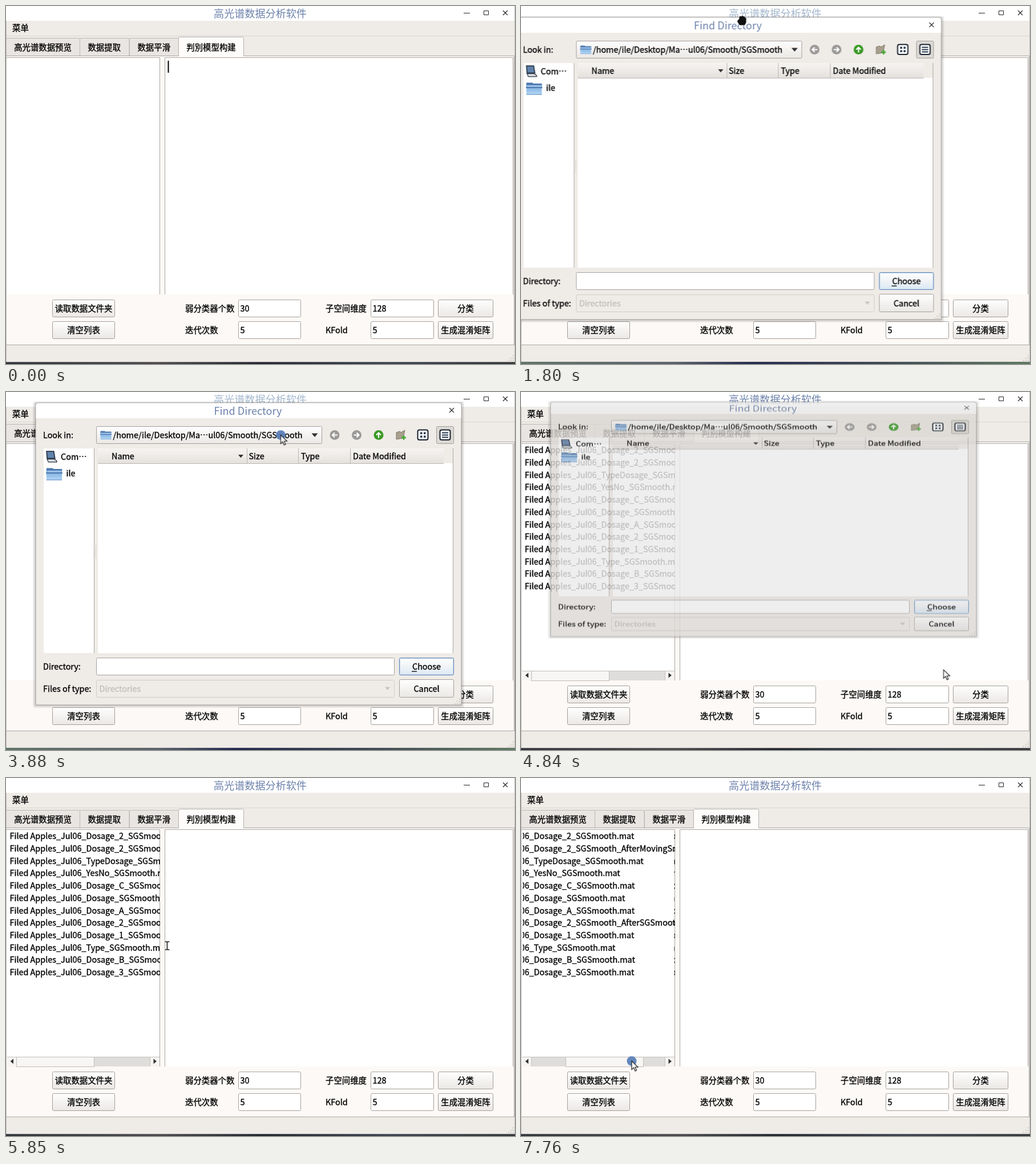
Animation of 892 by 628 pixels, one loop 8 s. Source, as an HTML page:

```html
<!DOCTYPE html>
<html lang="zh-CN">
<head>
<meta charset="utf-8">
<title>高光谱数据分析软件</title>
<style>
html, body { margin: 0; width: 100%; height: 100%; overflow: hidden; background: #efebe7; }
svg { display: block; width: 892px; height: 628px; }
text {
  font: 500 14.4px "Noto Sans CJK SC", "Noto Sans", sans-serif; white-space: pre;
  color: #000; fill: currentColor; stroke: currentColor; stroke-width: .35px;
}
.mid { text-anchor: middle; }
.big { font-size: 18.1px; font-weight: 400; color: #6c81ab; stroke: none; text-anchor: middle; }
.dim { color: #c3bfbb; }
.field { fill: #fff; stroke: #a5a19d; }
.btn { fill: url(#face); stroke: #a29e9a; }
.line { fill: none; stroke: #aaa6a2; }

/* on/off states switch hard, paths run linearly */
.sw { animation: 8s step-end infinite; }
.mv { animation: 8s linear infinite; }
#title { animation-name: title; }
#strip { animation-name: modal; }
#caret { animation-name: caret; }
#press { animation-name: press; }
#dlg { animation-name: drag; }
#fold { animation-name: fold; transform-origin: 0 19px; }
#pop { animation-name: pop; }
#hl { animation-name: hl; }
#row0 { animation-name: row0; }
#row1 { animation-name: row1; }
#files { animation-name: files; }
#rows { animation-name: scroll; }
#thumb { animation-name: thumb; }
#ptr { animation-name: path; }
#arrow { animation-name: arrow; }
#hand { animation-name: hand; }
#beam { animation-name: beam; }
#ring { animation-name: ring; }
#dot { animation-name: dot; }
#hover { animation-name: hover; }

@keyframes title { 0% { color: #6c81ab } 9.75% { color: #a3b7cd } 59.5% { color: #6c81ab } }
@keyframes modal { 0% { visibility: hidden } 9.75% { visibility: visible } 59.5% { visibility: hidden } }
@keyframes caret { 0% { visibility: visible } 5.125% { visibility: hidden } }
@keyframes press { 0% { visibility: hidden } .625% { visibility: visible } 9.75% { visibility: hidden } }
@keyframes hover { 0% { visibility: hidden } 81.7% { visibility: visible } 84.5% { visibility: hidden } }
@keyframes drag {
  0%, 20.5% { transform: translate(-118px, 1px) }
  22.5%, 22.9% { transform: translate(-61.5px, 1px) }
  25.25%, to { transform: none }
}
@keyframes fold {
  0%, 9.75% { transform: translateY(-6px) scaleY(.05); opacity: 0; filter: brightness(.7) }
  14%, 59.5% { transform: none; opacity: 1; filter: brightness(1) }
  63%, 63.4% { transform: translateY(-5px) scaleY(.228); opacity: .4; filter: brightness(.73) }
  64.5%, to { transform: translateY(-6px) scaleY(.05); opacity: 0; filter: brightness(.7) }
}
@keyframes pop { 0% { visibility: hidden } 29.375% { visibility: visible } 48.5% { visibility: hidden } }
@keyframes hl { 0% { transform: none } 37% { transform: translateY(31px) } 41.4% { transform: none } }
@keyframes row0 { 0% { color: #fff } 37% { color: #000 } 41.4% { color: #fff } }
@keyframes row1 { 0% { color: #000 } 37% { color: #fff } 41.4% { color: #000 } }
@keyframes files { 0% { visibility: hidden } 59.5% { visibility: visible } }
@keyframes thumb {
  0%, 86.875% { transform: none }
  88.125%, 93% { transform: translateX(16px) }
  97%, to { transform: translateX(60px) }
}
@keyframes scroll {
  0%, 86.875% { transform: none }
  88.125%, 93% { transform: translateX(-31.5px) }
  97%, to { transform: translateX(-118px) }
}
@keyframes path {
  0%, 12.5% { transform: translate(140px, 520px) }
  18.75%, 20.5% { transform: translate(330px, 25px) }
  22.5%, 22.9% { transform: translate(387px, 25px) }
  25.25% { transform: translate(448px, 24px) }
  27.875%, 32.875% { transform: translate(482px, 76px) }
  36.375% { transform: translate(477.5px, 87px) }
  38.375%, 40.375% { transform: translate(476px, 101px) }
  42.875% { transform: translate(478px, 77px) }
  43.875%, 49.25% { transform: translate(481.5px, 75.5px) }
  58%, 60% { transform: translate(742px, 491px) }
  63%, 63.5% { transform: translate(733px, 469px) }
  69%, 69.5% { transform: translate(308px, 288px) }
  73.625%, 75.875% { transform: translate(279px, 295px) }
  78.75% { transform: translate(180px, 104px) }
  83% { transform: translate(125px, 522px) }
  85.875%, 86.875% { transform: translate(133.5px, 499px) }
  88.125%, 93% { transform: translate(149.5px, 498px) }
  97%, to { transform: translate(194px, 496.5px) }
}
@keyframes arrow {
  0% { visibility: hidden } 12.5% { visibility: visible } 20.25% { visibility: hidden }
  25.25% { visibility: visible } 61% { visibility: hidden } 76% { visibility: visible }
}
@keyframes hand { 0% { visibility: hidden } 20.25% { visibility: visible } 25.25% { visibility: hidden } }
@keyframes beam { 0% { visibility: hidden } 61% { visibility: visible } 76% { visibility: hidden } }
@keyframes ring { 0% { visibility: hidden } 61% { visibility: visible } 68% { visibility: hidden } }
@keyframes dot {
  0% { visibility: hidden } 28.6% { visibility: visible } 29.375% { visibility: hidden }
  48.5% { visibility: visible } 49.5% { visibility: hidden }
  59% { visibility: visible } 60% { visibility: hidden } 86.375% { visibility: visible }
}
</style>
</head>
<body>
<svg id="stage" viewBox="0 0 892 628" xmlns="http://www.w3.org/2000/svg">
  <defs>
    <linearGradient id="face" x2="0" y2="1"><stop stop-color="#fefefe"/><stop offset="1" stop-color="#ebe8e5"/></linearGradient>
    <linearGradient id="glow" x2="0" y2="1"><stop stop-color="#fdfeff"/><stop offset=".5" stop-color="#f1f4f7"/><stop offset="1" stop-color="#dbe8f4"/></linearGradient>
    <linearGradient id="head" x2="0" y2="1"><stop stop-color="#f6f4f2"/><stop offset="1" stop-color="#e5e1dd"/></linearGradient>
    <linearGradient id="sel" x2="0" y2="1"><stop stop-color="#7a96c1"/><stop offset="1" stop-color="#6684b4"/></linearGradient>
    <linearGradient id="blue" x2="0" y2="1"><stop stop-color="#86b4e2"/><stop offset="1" stop-color="#b4d6f4"/></linearGradient>
    <linearGradient id="desk"><stop stop-color="#30343a"/><stop offset=".3" stop-color="#4a4a4c"/><stop offset=".5" stop-color="#22262e"/><stop offset=".75" stop-color="#3c4450"/><stop offset="1" stop-color="#35383a"/></linearGradient>
    <linearGradient id="desk2"><stop stop-color="#5d7468"/><stop offset=".3" stop-color="#59616a"/><stop offset=".45" stop-color="#20284e"/><stop offset=".7" stop-color="#3a4450"/><stop offset="1" stop-color="#5c7a60"/></linearGradient>
    <clipPath id="view"><path d="M3 91H268.5V488H3Z"/></clipPath>
    <clipPath id="edge"><path d="M268.5 91H270V488H268.5Z"/></clipPath>
    <symbol id="dir" viewBox="0 0 20 16">
      <path d="M.5 1H8L9 2H19.5V8H.5Z" fill="#4a78b0"/><path d="M1 4H19V7H1Z" fill="#9cc0e6"/>
      <path d="M.5 7H19.5V15.5H.5Z" fill="url(#blue)"/><path d="M0 7H20" stroke="#3f6ea8" stroke-width="1.2"/>
      <path d="M.5 15.5H19.5" stroke="#7ba6d4"/>
    </symbol>
    <symbol id="pc" viewBox="0 0 20 20">
      <path d="M2 1H14L16 13H3Z" fill="#5f82ac" stroke="#26313f" stroke-width="1.6"/>
      <path d="M3 14H15L19 17V19H5Z" fill="#d9dde2" stroke="#26313f" stroke-width="1.2"/>
    </symbol>
    <symbol id="disk" viewBox="0 0 20 20">
      <path d="M3 1H17L19 14V19H1V14Z" fill="#a9b9cd" stroke="#6f8299"/><circle cx="10" cy="8" r="5" fill="#dfe7f0" stroke="#7f93ab"/>
      <path d="M3 16H17" stroke="#5f738b" stroke-width="2"/>
    </symbol>
  </defs>
  <g id="main"></g>
  <g id="dlg" class="mv"><g id="fold" class="mv"></g></g>
  <g id="pop" class="sw"></g>
  <g id="ptr" class="mv">
    <circle id="dot" class="sw" r="8.5" fill="#5b80b8" opacity=".95"/>
    <g id="ring" class="sw"><circle cx="10" cy="14.5" r="10.5" fill="#fff" stroke="#a5d2f5" stroke-width="5"/></g>
    <path id="arrow" class="sw" d="M0 0V15L3.5 11.7L6 17.5L8.5 16.5L6 10.8H11Z" fill="#fff" stroke="#111" stroke-width="1.1"/>
    <path id="hand" class="sw" d="M-8 0L-5-2V-6Q-3-9-1-7Q1-10 3-7Q6-8 6-5Q9-5 8-1V4L5 9H-4L-8 3Z" fill="#111" stroke="#fff" stroke-width=".8"/>
    <g id="beam" class="sw" fill="none"><path d="M-4-7H-1L0-6L1-7H4M0-6V6M-4 7H-1L0 6L1 7H4" stroke="#fff" stroke-width="3.4"/><path d="M-4-7H-1L0-6L1-7H4M0-6V6M-4 7H-1L0 6L1 7H4" stroke="#111" stroke-width="1.6"/></g>
  </g>
</svg>
<script>
const $ = id => document.getElementById(id);
// y is the middle of the line of text; baselines sit on whole pixels
const txt = (x, y, s, attr = '') => `<text x="${x}" y="${Math.round(y + 5.3)}" ${attr}>${s}</text>`;
const box = (x, y, w, h, attr = '') => `<rect x="${x}" y="${y}" width="${w}" height="${h}" ${attr}/>`;
const path = (d, attr = 'class="line"') => `<path d="${d}" ${attr}/>`;
const use = (id, x, y, w, h) => `<use href="#${id}" x="${x}" y="${y}" width="${w}" height="${h}"/>`;
const button = (x, y, w, s) => box(x + .5, y + .5, w - 1, 30, 'rx="2" class="btn"') + txt(x + w / 2, y + 15.5, s, 'class="mid"');
const field = (x, y, w, s = '') => box(x + .5, y + .5, w - 1, 30, 'rx="2" class="field"') + txt(x + 3.5, y + 15.5, s);
const tab = (x, w, s) => box(x + .5, 56.5, w, 31, 'rx="1.5" fill="#e9e5e2" stroke="#bbb7b3"') + txt(x + w / 2, 73, s, 'class="mid"');
const grip = (x, y) => [[8, 0], [4, 4], [8, 4], [0, 8], [4, 8], [8, 8]].map(p => box(x + p[0], y + p[1], 1.5, 1.5, 'fill="#b5b1ad"')).join('');
const cross = (x, y) => path(`M${x - 4} ${y - 4}l8 8m0-8l-8 8`, 'stroke="#222" stroke-width="1.1"');

const tail = '_SGSmooth';
const names = ['Dosage_2' + tail, `Dosage_2${tail}_AfterMovingSmooth`, 'TypeDosage' + tail, 'YesNo' + tail,
  'Dosage_C' + tail, 'Dosage' + tail, 'Dosage_A' + tail, `Dosage_2${tail}_After${tail.slice(1)}`,
  'Dosage_1' + tail, 'Type' + tail, 'Dosage_B' + tail, 'Dosage_3' + tail];
const rows = names.map((n, i) => txt(6.5, 102 + i * 21.7, `Filed Apples_Jul06_${n}.mat`)).join('');

$('main').innerHTML =
  box(0, 0, 892, 26, 'fill="#fff"') + box(0, 26, 892, 599, 'fill="#efebe7"') +
  `<text id="title" class="big sw" x="445.5" y="20">高光谱数据分析软件</text>` +
  path('M802 12.5H813M837.5 8.5H845.5V15.5H837.5Z', 'fill="none" stroke="#222"') + cross(875, 12) +
  txt(11, 39, '菜单') + path('M0 52.5H892', 'stroke="#d9d5d1"') +
  box(0, 87, 891, 508, 'fill="#fcf9f6"') +
  tab(0, 129, '高光谱数据预览') + tab(129, 86.5, '数据提取') + tab(216, 86.5, '数据平滑') +
  path('M0 87.5H890.5V594.5') +
  path('M302.5 91V56.5Q302.5 54.5 304.5 54.5H414.5Q416.5 54.5 416.5 56.5V91', 'fill="#fdfcfa" stroke="#b5b1ad"') +
  box(301, 88, 117, 4, 'fill="#fcf9f6"') + txt(359.5, 72.5, '判別模型构建', 'class="mid"') +
  box(1, 90, 269, 416, 'fill="#fff"') + path('M1 90.5H269.5V506') +
  box(278, 90, 611, 416, 'fill="#fff"') + path('M278.5 506V90.5H888.5V506') +
  box(283.5, 96, 2, 21, 'id="caret" class="sw"') +
  button(81, 515, 110, '读取数据文件夹') + button(81, 553, 110, '清空列表') +
  box(82, 523, 108, 21, 'id="press" class="sw" fill="#000" opacity=".04"') +
  box(82, 516, 108, 29, 'id="hover" class="sw" fill="#fff" opacity=".35"') +
  txt(314, 530.5, '弱分类器个数') + field(407, 515, 110, '30') +
  txt(314, 569, '迭代次数') + field(407, 553, 110, '5') +
  txt(560, 530.5, '子空间维度') + field(639, 515, 111, '128') +
  txt(560, 569, 'KFold') + field(639, 553, 111, '5') +
  button(757, 515, 97, '分类') + button(757, 553, 97, '生成混淆矩阵') +
  path('M0 594.5H892') + grip(880, 613) +
  path('M.5 26V625M891.5 0V625', 'stroke="#c4c0bc"') +
  box(0, 624.5, 892, 4, 'fill="url(#desk)"') + box(0, 624.5, 892, 4, 'id="strip" class="sw" fill="url(#desk2)"') +
  `<g id="files" class="sw"><g clip-path="url(#view)"><g id="rows" class="mv">${rows}</g></g>` +
  `<g clip-path="url(#edge)">${rows}</g>` +
  box(2, 489, 267, 17, 'fill="#f6f4f2"') + box(18, 489, 235, 17, 'fill="#dfdddb"') +
  path('M2 489.5H269M18.5 489V506M252.5 489V506', 'stroke="#c5c1bd"') +
  box(18.5, 489.5, 136, 17, 'id="thumb" class="mv" fill="#f7f6f4" stroke="#c0bcb8"') +
  path('M13 492.5V501.5L7.5 497ZM258.5 492.5V501.5L264 497Z', 'fill="#333"') + '</g>';

const round = (x, fill, d) => `<circle cx="${x}" cy="75.5" r="8.5" fill="${fill}"/>` +
  path(d, 'fill="none" stroke="#fff" stroke-width="2.2"');

$('fold').innerHTML =
  [5, 3, 1].map(g => box(52 - g, 19 - g / 2, 746 + 2 * g, 530 + g * 1.5, 'rx="4" fill="#000" opacity=".07"')).join('') +
  path('M52 549V23Q52 19 56 19H794Q798 19 798 23V549Z', 'fill="#efebe7" stroke="#8f8b88" stroke-width=".8"') +
  path('M52.5 46V23Q52.5 19.5 56 19.5H794Q797.5 19.5 797.5 23V46Z', 'fill="#fff"') +
  '<text class="big" x="424" y="40">Find Directory</text>' + cross(781, 32) +
  txt(65, 75.5, 'Look in:') + box(158.5, 60.5, 395, 30, 'rx="2" class="btn"') +
  use('dir', 165, 67.5, 20, 16) + txt(187.5, 75.5, '/home/ile/Desktop/Ma…ul06/Smooth/SGSmooth') +
  path('M535.5 72.5H546.5L541 79Z', 'fill="#333"') +
  round(576, '#9c9a98', 'M581 75.5H572M576 71.5L572 75.5L576 79.5') +
  round(614.5, '#9c9a98', 'M609.5 75.5H618.5M614.5 71.5L618.5 75.5L614.5 79.5') +
  round(653, '#3a9a26', 'M653 80.5V71.5M649 75.5L653 71.5L657 75.5') +
  path('M684 71L690 69L692 71L699 67L696 81L684 83Z', 'fill="#a89f8d" stroke="#7d7666"') +
  path('M697 76V84M693 80H701', 'stroke="#45a832" stroke-width="2.6"') +
  box(754.5, 60.5, 30, 30, 'rx="2" fill="#dcd8d4" stroke="#a29e9a"') +
  [721.5, 760.5].map(x => box(x, 66.5, 18, 17.5, 'rx="3" fill="#fff" stroke="#18222e" stroke-width="2"')).join('') +
  [[726, 70.5], [732, 70.5], [726, 76.5], [732, 76.5]].map(p => box(...p, 3.5, 3.5, 'fill="#26384e"')).join('') +
  path('M764 71.5H775M764 75.5H775M764 79.5H775', 'stroke="#26384e" stroke-width="1.8"') +
  box(66, 99, 88, 359, 'fill="#fff"') + path('M154.5 99V458') +
  use('pc', 69, 103, 21, 21) + txt(96, 113.5, 'Com…') + use('dir', 70, 132, 29, 23) + txt(105.5, 143, 'ile') +
  path('M157.5 270V291', 'stroke="#aaa6a2" stroke-dasharray="1.5 2.5"') +
  box(161, 99, 623, 359, 'fill="#fff"') + box(161, 99, 623, 26, 'fill="#efebe7"') +
  box(161, 99, 606, 26, 'fill="url(#head)"') + box(767, 125, 17, 1, 'fill="#fff"') +
  path('M161 125.5H767M422.5 99V125M512.5 99V125M603.5 99V125', 'stroke="#b9b5b1"') + path('M783.5 99V458') +
  txt(185, 113, 'Name') + path('M407 110H416L411.5 115.5Z', 'fill="#333"') +
  txt(425.5, 113, 'Size') + txt(517, 113, 'Type') + txt(608, 113, 'Date Modified') +
  txt(65, 482, 'Directory:') + field(158, 466, 523) +
  box(689.5, 466.5, 95, 30, 'rx="2" fill="url(#glow)" stroke="#5f86b6"') +
  box(690.5, 467.5, 93, 28, 'rx="1.5" fill="none" stroke="#c3d9ef"') +
  txt(737, 482, 'Choose', 'class="mid"') + box(711, 489.5, 9, 1.3) +
  txt(65, 520.5, 'Files of type:') + box(158.5, 505.5, 522, 30, 'rx="2" fill="#efebe7" stroke="#cfcbc7"') +
  txt(163.5, 520.5, 'Directories', 'class="dim"') + path('M664 517.5H673L668.5 523Z', 'fill="#c8c4c0"') +
  box(689.5, 504.5, 95, 31, 'rx="2" class="btn"') + txt(737, 520.5, 'Cancel', 'class="mid"') + grip(786, 538);

const home = '/home/ile', mat = home + '/Desktop/Mat', crop = mat + '/Filed Apples_Jul06', demo = home + '/GitHub/HyperspectralSoftwareDemo';
const places = [crop + '/Smooth/SGSmooth', crop + '/Smooth', crop, mat, home + '/Desktop', home, '/home', '/', 'Computer',
  'Recent Places', crop + '/Smooth/SGSmooth', crop + '/Smooth/MovingSmooth', demo, demo + '/Data'];
const mid = i => Math.round(76 + i * 31.25);
const icon = (s, y) => s === '/' ? use('disk', 170, y - 11, 21, 21) : s === 'Computer' ? use('pc', 170, y - 10, 21, 21)
  : s[0] === '/' ? use('dir', 171, y - 7.5, 19, 15) : '';
const label = (s, i) => s[0] === 'R'
  ? txt(168, mid(i) + 1, s, 'style="color:#fff"') + txt(167, mid(i), s, 'class="dim"')
  : txt(201, mid(i), s, i < 2 ? `id="row${i}" class="sw"` : '');
$('pop').innerHTML =
  box(158.5, 59.5, 515, 438, 'fill="#efebe7" stroke="#a5a19d"') +
  places.map((s, i) => icon(s, mid(i))).join('') +
  '<g id="hl" class="sw">' + box(159.5, 60.5, 513, 30, 'fill="url(#sel)" stroke="#5b7bad"') +
  box(172, 70, 17, 4, 'fill="#e4eefa"') + box(171.5, 76, 18.5, 7, 'fill="#f4f9ff"') + '</g>' +
  places.map(label).join('');
</script>
</body>
</html>
```
